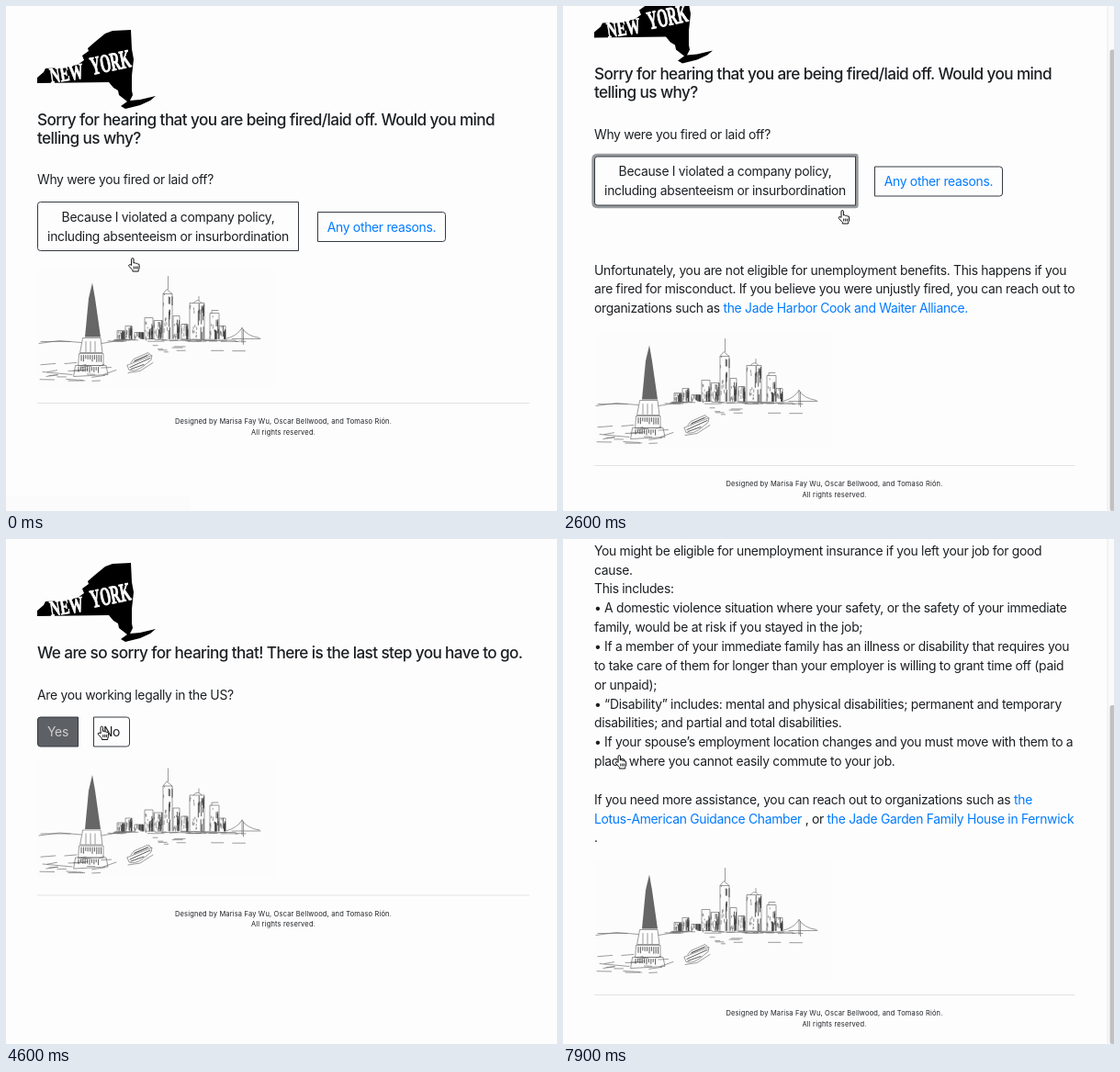
Write an HTML page that moves like this. It is 600 px wide and 550 px high and loops after 8 s.

```html
<!DOCTYPE html>
<html lang="en">
<head>
<meta charset="utf-8">
<title>Benefits questionnaire</title>
<style>
html, body { margin: 0; width: 600px; height: 550px; overflow: hidden; background: #fefdfe; }
svg { display: block; }
text { font: 13.9px Inter, sans-serif; letter-spacing: -.0215em; fill: #1c2023; white-space: pre; }
.head { font-size: 17.2px; font-weight: 500; letter-spacing: -.035em; }
.small { font-size: 7.5px; letter-spacing: .022em; text-anchor: middle; }
.link { fill: #007bff; }
.btn text { text-anchor: middle; }
.btn .face { fill: color-mix(in srgb, #2f343a calc(var(--hover, 0) * 100%), #fefdfe); stroke: #343a40; }
.btn .ring { fill: none; stroke: #343a40; stroke-width: 6.4; stroke-linejoin: round; stroke-opacity: .5; opacity: var(--focus, 0); }
.btn text:not(.link) { fill: color-mix(in srgb, #fff calc(var(--hover, 0) * 100%), #1c2023); }
.state { font: bold 16px "Liberation Serif", serif; letter-spacing: 0; fill: #fff; stroke: #fff; stroke-width: .6; }
.sketch { fill: none; stroke: #666; stroke-width: .65; stroke-linecap: round; }
</style>
</head>
<body>
<svg width="600" height="550" viewBox="0 0 600 550">
  <g id="page">
    <path d="M34 78L41 72 43 68 62 67 78 64 85 59 83 54 90 49 89 46 97 39 108 30 116 27 136 26 137 47 139 58 137 76 137 92 138 97 135 103 146 102 163 98 157 103 146 108 130 112 125 109 132 104 123 97 122 92 117 89 112 83 34 84Z"/>
    <text class="state" transform="translate(49 84)rotate(-9)scale(.96 1.5)">NEW</text>
    <text class="state" transform="translate(94 75)rotate(-12)scale(.92 1.75)">YORK</text>
    <g id="fired"></g>
    <g id="legal"></g>
    <g id="foot"></g>
  </g>
  <path id="status" d="M0 534H198Q200 534 200 537V550H0Z" fill="#eee"/>
  <g id="bar">
    <path d="M593 0H600V550H593Z" fill="#fafafa"/>
    <path d="M593 0V550" stroke="#e9e9e9"/>
    <rect id="thumb" x="595.5" width="6" rx="2.5" fill="#c1c1c1"/>
  </g>
  <path id="hand" fill="#fff" stroke="#111" stroke-linejoin="round" d="M3.6 8.5V1.8a1.2 1.2 0 0 1 2.4 0V6q1.7-.8 2.2.4 1.5-.6 2 .5 1.9-.4 1.9 1.2V11q0 1.4-.9 2.6V15H4.9V13.6L1 9.4Q.1 8 1.5 7.7T3.6 8.5M6.3 9.5v3M8.3 9.5v3M10.2 9.5v3"/>
</svg>
<script>
const $ = id => document.getElementById(id);
const PITCH = 20.85;

const line = (x, y, s, cls = '') => `<text x="${x}" y="${y}" class="${cls}">${s}</text>`;
const lines = (y, list) => list.map((s, i) => line(34, y + i * PITCH, s)).join('');
const link = s => `<tspan class="link">${s}</tspan>`;

// Grouped buttons: only the outer side is rounded.
function button(id, x, y, w, h, labels, roundLeft, cls) {
  const r = 3;
  const d = roundLeft
    ? `M${x + w} ${y}v${h}h${r - w}q${-r} 0 ${-r} ${-r}v${2 * r - h}q0 ${-r} ${r} ${-r}z`
    : `M${x} ${y}v${h}h${w - r}q${r} 0 ${r} ${-r}v${2 * r - h}q0 ${-r} ${-r} ${-r}z`;
  const first = y + h / 2 + 5.2 - (labels.length - 1) * PITCH / 2;
  return `<g id="${id}" class="btn"><path class="ring" d="${d}"/><path class="face" d="${d}"/>
    ${labels.map((s, i) => line(x + w / 2, first + i * PITCH, s, cls)).join('')}</g>`;
}

$('fired').innerHTML =
  line(34, 129.5, 'Sorry for hearing that you are being fired/laid off. Would you mind', 'head') +
  line(34, 149.7, 'telling us why?', 'head') +
  line(34, 194, 'Why were you fired or laid off?') +
  button('policy', 34.5, 213.5, 284, 53, ['Because I violated a company policy,', 'including absenteeism or insurbordination'], true) +
  button('other', 339.5, 224.5, 139, 32, ['Any other reasons.'], false, 'link') +
  `<g id="refusal">${lines(342, [
    'Unfortunately, you are not eligible for unemployment benefits. This happens if you',
    'are fired for misconduct. If you believe you were unjustly fired, you can reach out to',
    'organizations such as ' + link('the Jade Harbor Cook and Waiter Alliance.')])}</g>`;

$('legal').innerHTML =
  `<text y="129.5" class="head"><tspan x="34">We are so sorry for hearing that! There is the last step you have to </tspan><tspan id="lastWord">go.</tspan></text>` +
  `<g id="ask">${line(34, 174.6, 'Are you working legally in the US?') +
    button('yes', 34.5, 194, 44, 32, ['Yes'], true) +
    button('no', 95.5, 194, 39, 32, ['No'], false)}</g>` +
  `<g id="unlikely">${line(34, 263, 'Unfortunately, you are probably not elighble for unemployment benefits.')}</g>` +
  `<g id="advice">${lines(283.2, [
    'You might be eligible for unemployment insurance if you left your job for good',
    'cause.',
    'This includes:',
    '• A domestic violence situation where your safety, or the safety of your immediate',
    'family, would be at risk if you stayed in the job;',
    '• If a member of your immediate family has an illness or disability that requires you',
    'to take care of them for longer than your employer is willing to grant time off (paid',
    'or unpaid);',
    '• “Disability” includes: mental and physical disabilities; permanent and temporary',
    'disabilities; and partial and total disabilities.',
    '• If your spouse’s employment location changes and you must move with them to a',
    'place where you cannot easily commute to your job.',
    '',
    'If you need more assistance, you can reach out to organizations such as ' + link('the'),
    link('Lotus-American Guidance Chamber') + ' , or ' + link('the Jade Garden Family House in Fernwick'),
    '.'])}</g>`;

// Harbor sketch, drawn relative to the rule below it.
function harbor() {
  let seed = 7;
  const rnd = (a, b) => a + (b - a) * ((seed = seed * 16807 % 2147483647) / 2147483647);
  let d = '', dark = '';
  const towers = [[121, -79, 8], [130, -84, 7], [140, -77, 10], [151, -93, 9], [161, -90, 9], [171, -119, 10],
    [182, -95, 7], [191, -86, 7], [200, -109, 16], [222, -98, 10], [232, -84, 7]];
  for (const [x, top, w] of towers) {
    d += `M${x} -70V${top}h${w}V-70`;
    for (let i = 0; i < w * .8; i++) {
      const hx = x + w * rnd(.55, 1), y = rnd(top, -76);
      dark += `M${hx} ${y}V${Math.min(-70, y + rnd(4, 16))}`;
      d += `M${x + w * rnd(0, .5)} ${rnd(top, -72)}v${rnd(1, 4)}`;
    }
  }
  d += 'M171 -119L175 -124 181 -119M176.5 -124V-138M204 -109Q209 -115 213 -109M210 -112V-116M224 -98V-101H231';
  d += 'M239 -70Q252 -73 257 -82 262 -73 276 -71M257 -82V-66M258.5 -80V-64M246 -70H277';
  for (let i = 0; i < 26; i++) {
    const x = rnd(104, 255), w = rnd(5, 25);
    d += `M${x} ${-69 + rnd(-1, 2)}q${w / 2} ${rnd(-1, 1)} ${w} 0`;
  }
  for (let i = 0; i < 20; i++) {
    const x = rnd(36, 105), w = rnd(4, 18);
    d += `M${x} ${rnd(-44, -24)}l${w} ${rnd(-2, 1)}`;
  }
  for (let i = 0; i < 9; i++) d += `M${rnd(160, 255)} ${rnd(-64, -54)}h${rnd(4, 15)}`;
  d += 'M36 -65L58 -68 82 -66M38 -67H70M104 -65L122 -68M40 -34L72 -31M106 -31L120 -36';
  d += 'M84 -71H103L105 -55H81ZM87 -67V-56M92 -67V-56M97 -67V-56M80 -54H106V-41H79ZM76 -41H109L111 -31 74 -29Z';
  for (let x = 82; x < 105; x += 2.4) dark += `M${x} -52v${rnd(2, 7)}M${x - 3} -39v${rnd(2, 6)}`;
  d += 'M132 -41L134 -36Q140 -34 148 -39L158 -47 159 -52 134 -42ZM136 -44L139 -48 155 -55 158 -52M139 -45L156 -53M133 -33L146 -35 160 -44';
  dark += 'M135 -39L157 -49M136 -37L150 -42M140 -46L154 -52';
  return `<path d="M34 -147H293V-19H34Z" fill="#fdfcfd"/>
    <path d="M94 -131L97 -114 103 -72H86L90 -114Z" fill="#666"/>
    <g class="sketch"><path d="${d}"/><path d="${dark}" stroke="#333" stroke-width=".8"/></g>`;
}

$('foot').innerHTML = harbor() + '<path id="rule" stroke="#e3e3e4"/><g id="credits">' +
  line(302, 22.8, 'Designed by Marisa Fay Wu, Oscar Bellwood, and Tomaso Rión.', 'small') +
  line(302, 34.2, 'All rights reserved.', 'small') + '</g>';

// Linear interpolation through [time, value, value...] stops.
function track(t, ...stops) {
  const i = stops.findIndex(s => s[0] > t);
  if (i < 0) return stops.at(-1).slice(1);
  if (!i) return stops[0].slice(1);
  const a = stops[i - 1], b = stops[i], u = (t - a[0]) / (b[0] - a[0]);
  return a.slice(1).map((v, k) => v + (b[k + 1] - v) * u);
}
const smooth = (t, from, to) => {
  const u = Math.min(1, Math.max(0, (t - from) / (to - from)));
  return u * u * (3 - 2 * u);
};
const show = (id, on) => $(id).style.display = on ? '' : 'none';
const move = (id, x, y) => $(id).setAttribute('transform', `translate(${x} ${y})`);
function paint(id, [hover], focus) {
  $(id).style.setProperty('--hover', hover);
  $(id).style.setProperty('--focus', focus);
}

function draw(t) {
  const first = t < 3600, refused = first && t >= 900;
  const unlikely = t >= 4900 && t < 6000, long = t >= 6000;
  const scrollable = refused || long;
  const ruleY = first ? (refused ? 550 : 432.5) : long ? 762 : unlikely ? 430 : 388;
  const height = long ? 815.5 : 599.5;
  const scroll = first ? 49.5 * smooth(t, 1750, 2300) : 265.5 * smooth(t, 6822, 7700);

  show('fired', first);
  show('legal', !first);
  show('refusal', refused);
  show('unlikely', unlikely);
  show('advice', long);
  show('bar', scrollable);

  const word = $('lastWord');
  if (long) { word.setAttribute('x', 34); word.setAttribute('y', 149.8); }
  else { word.removeAttribute('x'); word.removeAttribute('y'); }
  move('ask', 0, long ? 20 : 0);
  move('page', 0, -scroll);
  move('foot', 0, ruleY);
  move('credits', scrollable ? -6.5 : 0, 0);
  $('rule').setAttribute('d', `M34 0H${scrollable ? 557.5 : 570}`);
  $('thumb').setAttribute('y', 2 + scroll * 550 / height);
  $('thumb').setAttribute('height', 550 * 550 / height - 2);

  paint('policy', track(t, [300, 0], [500, 1], [2000, 1], [2200, 0]), track(t, [700, 0], [900, 1])[0]);
  paint('other', track(t, [2900, 0], [3000, .48], [3100, 1]), 0);
  paint('yes', track(t, [4300, 0], [4400, 1], [4500, 1], [4600, .78], [4800, 0], [5600, 0], [5800, 1],
    [6000, 1], [6100, 0], [6500, 0], [6700, 1], [7000, 1], [7200, 0]), t >= 5700 ? 1 : 0);
  paint('no', track(t, [4600, 0], [4800, 1], [5500, 1], [5700, 0]), t >= 4800 && t < 5700 ? 1 : 0);

  $('status').style.opacity = track(t, [0, .18], [800, .18], [900, 0], [3000, 0], [3100, .8], [3300, .8], [3500, 0])[0];
  move('hand', ...track(t, [300, 133, 274], [600, 269, 243], [2300, 269, 243], [3000, 340, 194], [3200, 371, 195],
    [4000, 371, 195], [4400, 53.5, 203.5], [4600, 99.5, 203.5], [5400, 99.5, 203.5], [5700, 53.5, 203.5],
    [6400, 53.5, 203.5], [6700, 56.5, 235]));
}

function tick() {
  draw(Math.floor(performance.now() % 8000 / 100) * 100);
  requestAnimationFrame(tick);
}
tick();
</script>
</body>
</html>
```
